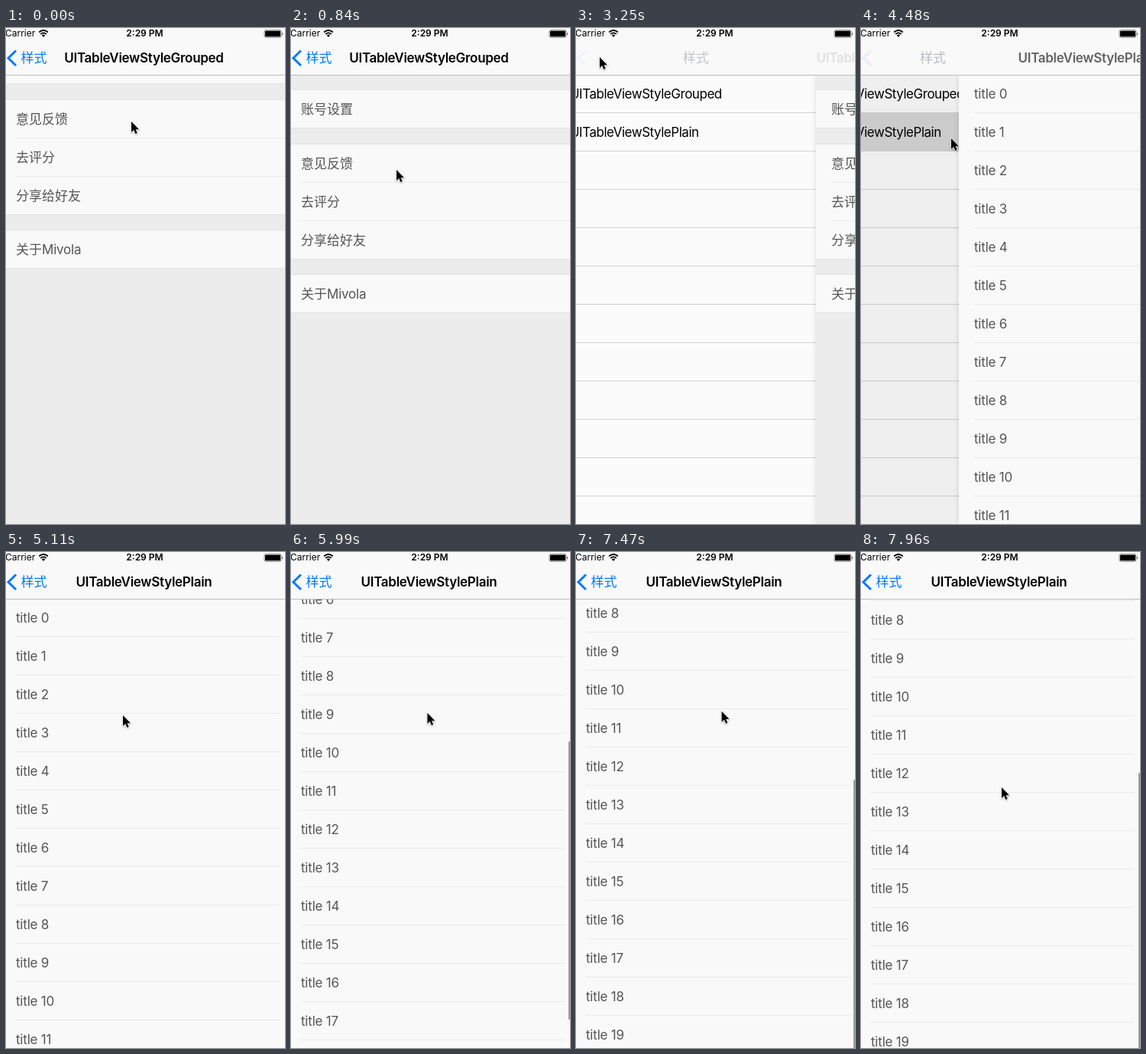
Recreate the animation shown at these times as an HTML page. Size 365 by 647 pixels, loop 8000 ms.

```html
<!DOCTYPE html>
<html lang="zh-CN">
<head>
<meta charset="utf-8">
<style>
html, body { margin: 0; width: 100%; height: 100%; overflow: hidden; background: #fff; }
#stage { position: relative; width: 365px; height: 647px; overflow: hidden;
  font: 17px/50px Inter, "Noto Sans CJK SC", "Noto Sans CJK", sans-serif; letter-spacing: -.2px; white-space: nowrap; }
#stage div, #stage svg { position: absolute; }
i { font-style: normal; letter-spacing: 0; }
.page { left: -7px; top: 61px; width: 375px; height: 586px; background: #f9f9f9; color: #555; }
.detail { box-shadow: 0 0 8px rgba(0,0,0,.12); }
.clip { inset: 0; overflow: hidden; }
.row { left: 0; width: 355px; height: 50px; padding-left: 20px; }
.line { left: 20px; right: 0; height: 1px; background: #e9e9e9; }
#list { background: #fff; color: #000; letter-spacing: -.47px; }
#list .row { padding-left: 15px; }
#list .line { left: 15px; background: #d6d6d8; }
#grouped { background: #ececec; }
.group { left: 0; width: 375px; background: #f9f9f9; box-shadow: 0 -1px #e3e3e3, inset 0 -1px #e3e3e3; }
#plain .line { right: 10px; }
#dim { inset: 0; background: #000; }
#bar { width: 365px; height: 61px; background: #f9f9f9; border-bottom: 1px solid #bdbdbf; }
#bar .label { top: 14px; }
.center { left: 0; width: 361px; text-align: center; }
.title { font-weight: 600; color: #000; letter-spacing: -.29px; }
.blue { color: #007aff; }
.status { font-size: 12px; line-height: 14px; letter-spacing: 0; top: 0; }
#thumb { right: 0; width: 2.5px; border-radius: 2px; background: #999; }
</style>
</head>
<body>
<div id="stage">
  <div id="list" class="page"><div id="pick" class="row" style="top:50px;background:#d9d9d9"></div></div>
  <div id="dim"></div>
  <div id="grouped" class="page detail"><div class="clip"><div id="groups"></div></div></div>
  <div id="plain" class="page detail"><div class="clip"><div id="items" style="width:375px"></div></div></div>
  <div id="thumb"></div>
  <div id="bar">
    <svg id="chevron" width="20" height="61" fill="none" stroke="#007aff" stroke-width="3"><path d="M13 29.500 3 39.200 13 49"/></svg>
    <div id="backBlue" class="label blue"><i>样式</i></div>
    <div id="backTitle" class="label"><i>样式</i></div>
    <div id="title" class="label center title"></div>
    <div class="status" style="left:-1px">Carrier</div>
    <svg style="left:42px;top:1px" width="14" height="12" fill="none" stroke="#000" stroke-width="1.8">
      <path d="M1.200 4.500Q7-.5 12.800 4.500M3.300 7Q7 3.800 10.700 7"/><path d="M4.800 8.600Q7 6.600 9.200 8.600L7 11z" fill="#000" stroke="none"/>
    </svg>
    <div class="status center" style="left:1px;font-weight:600">2:29 PM</div>
    <svg style="left:337px;top:2px" width="28" height="12">
      <rect x="1" y=".8" width="22" height="9.400" rx="2" fill="none" stroke="#000" stroke-width=".5"/>
      <rect x="2" y="1.800" width="20" height="7.400" rx="1"/><path d="M24.300 3.500q1.500 2 0 4z"/>
    </svg>
  </div>
  <svg id="cursor" width="18" height="24" style="overflow:visible;filter:drop-shadow(0 1px 1px rgba(0,0,0,.3))">
    <path d="M1 1V15L4.200 12 6.400 17 8.700 16 6.600 11.200H11Z" stroke="#fff" stroke-width="1.200" paint-order="stroke"/>
  </svg>
</div>
<script>
const LOOP = 8000, POP = 3074, PUSH = 4369, WIDTH = 375, MAX_SCROLL = 397;
const $ = id => document.getElementById(id);
const clamp = x => Math.min(1, Math.max(0, x));
const smooth = x => x * x * (3 - 2 * x);
const easeOut = x => 1 - (1 - x) ** 3;
const spring = ms => ms <= 0 ? 0 : 1 - (1 + ms * .0194) * Math.exp(-ms * .0194);

// Keys are [time, value]; the value rests outside and eases between them.
function track(t, keys, ease) {
  let value = keys[0][1];
  for (let k = 1; k < keys.length; k++) {
    const [t0, v0] = keys[k - 1], [t1, v1] = keys[k];
    if (t >= t0) value = v0 + (v1 - v0) * ease(clamp((t - t0) / (t1 - t0)));
  }
  return value;
}

const row = (y, text) => `<div class="row" style="top:${y}px">${text}</div>`;
const line = y => `<div class="line" style="top:${y}px"></div>`;
const group = (y, names) => `<div class="group" style="top:${y}px;height:${names.length * 50}px">` +
  names.map((name, n) => row(n * 50, name) + (n ? line(n * 50 - 1) : '')).join('') + '</div>';

$('list').innerHTML += row(0, 'UITableViewStyleGrouped') + row(50, 'UITableViewStylePlain') +
  Array.from({ length: 11 }, (_, n) => line(n * 50 + 49)).join('');
$('groups').innerHTML = group(20, ['<i>账号设置</i>']) +
  group(91, ['<i>意见反馈</i>', '<i>去评分</i>', '<i>分享给好友</i>']) +
  group(261, ['<i>关于</i>Mivola']);
$('items').innerHTML = Array.from({ length: 20 }, (_, n) => row(n * 50, 'title ' + n) + line(n * 50 + 49)).join('');

const bounce = [[60, -58], [720, 0]];
const scrollKeys = [[5410, 0], [6200, 330], [6260, 330], [6700, 432], [7290, 432], [7800, MAX_SCROLL]];
const cursorX = [[60, 163], [840, 137], [1780, 137], [2360, 30], [3350, 30], [3830, 117], [4680, 117],
  [5110, 152], [5410, 152], [5700, 165], [6200, 185], [6700, 191], [7290, 191], [7960, 183]];
const cursorY = [[60, 121], [840, 184], [1780, 184], [2360, 37], [3350, 37], [3830, 143], [4680, 143],
  [5110, 212], [5410, 212], [5700, 125], [6200, 260], [6700, 185], [7290, 185], [7960, 306]];

const shift = (id, x, y = 0) => $(id).style.transform = `translate(${x}px,${y}px)`;
const fade = (id, alpha) => $(id).style.opacity = clamp(alpha);

function draw(t) {
  const pushed = t >= PUSH, e = t - (pushed ? PUSH : POP);
  const detailAt = ms => pushed ? spring(ms) : 1 - spring(ms);
  const detail = detailAt(e), bar = detailAt(e - 8);

  shift('list', -.3 * WIDTH * detail);
  fade('dim', .1 * detail);
  fade('pick', pushed ? 1 : 0);
  $('grouped').style.display = pushed ? 'none' : '';
  $('plain').style.display = pushed ? '' : 'none';
  shift(pushed ? 'plain' : 'grouped', Math.round(WIDTH * (1 - detail)));

  $('title').textContent = pushed ? 'UITableViewStylePlain' : 'UITableViewStyleGrouped';
  shift('title', 284 * (1 - bar));
  fade('title', pushed ? e / 185 : 1 - e / 195);
  const backX = 19.5 + 143.5 * (1 - bar);
  shift('backBlue', backX);
  shift('backTitle', backX);
  const blue = pushed ? (e - 95) / 200 : 1 - e / 185;
  fade('backBlue', blue);
  fade('chevron', blue);
  fade('backTitle', pushed ? 1 - e / 140 : (e - 140) / 200);

  shift('groups', 0, Math.round(track(t, bounce, easeOut)));
  const scroll = Math.round(track(t, scrollKeys, easeOut));
  shift('items', 0, -scroll);
  const over = Math.max(0, scroll - MAX_SCROLL);
  $('thumb').style.top = 64 + 224 * Math.min(1, scroll / MAX_SCROLL) + over + 'px';
  $('thumb').style.height = 363 - over + 'px';
  fade('thumb', (t - 5410) / 60);

  shift('cursor', track(t, cursorX, smooth), track(t, cursorY, smooth));
}

function tick() {
  draw(performance.now() % LOOP);
  requestAnimationFrame(tick);
}
tick();
</script>
</body>
</html>
```
